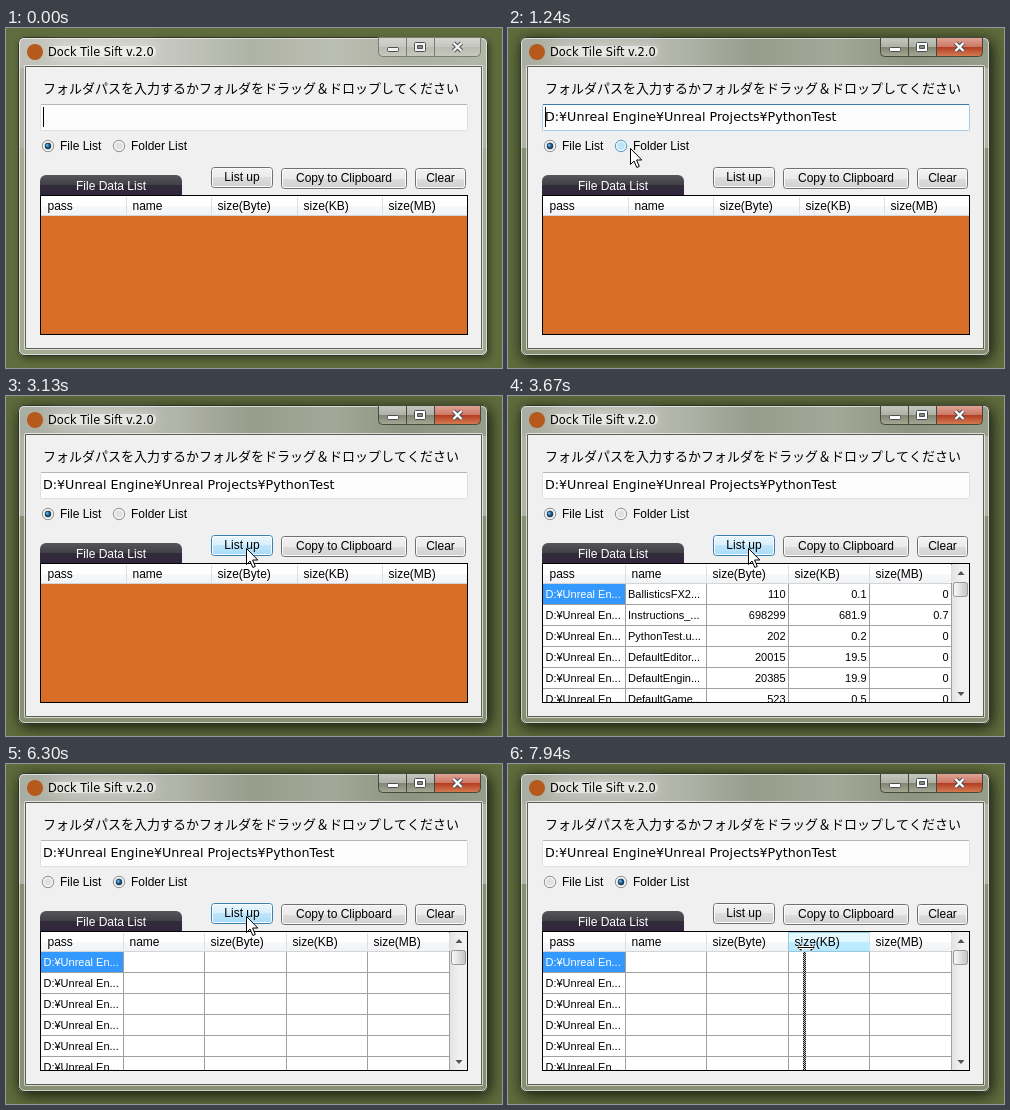
An HTML page with a canvas that plays this animation: 496 by 340 pixels, repeating every 8000 ms.

```html
<!DOCTYPE html>
<html lang="ja">
<head>
<meta charset="utf-8">
<style>
html, body { margin: 0; width: 100%; height: 100%; overflow: hidden; background: #5f6c3c; }
canvas { display: block; }
</style>
</head>
<body>
<canvas id="stage" width="496" height="340"></canvas>
<script>
const ctx = document.getElementById('stage').getContext('2d');
const LOOP = 8000;
const UI = '12px "Liberation Sans", sans-serif';
const CELL = '11px "Liberation Sans", sans-serif';
const WIDE = 'px "DejaVu Sans", sans-serif';

// Moments when the interface changes, in ms
const at = {
  activate: 70, drop: 780, caret: 1090, folderMode: 1600, fileMode: 2420,
  press: 3260, release: 3430, fileRows: 3670, folderModeAgain: 5360,
  pressAgain: 5970, releaseAgain: 6200, folderRows: 6290, resize: 7200, split: 7450
};

const spot = {
  enter: [290, 338], field: [195, 80], drop: [177, 85], fileRadio: [43, 109],
  folderRadio: [122, 120], listButton: [240, 152], splitter: [119, 183], splitEnd: [298, 183]
};

// Pointer moves: start, end, destination and downward sag in between
const moves = [
  [150, 540, spot.field, 0],
  [540, 850, spot.drop, 0],
  [850, 1240, spot.folderRadio, 20],
  [1640, 2100, spot.fileRadio, 0],
  [2420, 3130, spot.listButton, 20],
  [4280, 4660, spot.folderRadio, 0],
  [5360, 5820, spot.listButton, 0],
  [6600, 7300, spot.splitter, 0],
  [7500, 7940, spot.splitEnd, 0]
];

const files = [
  ['BallisticsFX2...', 110], ['Instructions_...', 698299], ['PythonTest.u...', 202],
  ['DefaultEditor...', 20015], ['DefaultEngin...', 20385], ['DefaultGame...', 523]
];
const headers = ['pass', 'name', 'size(Byte)', 'size(KB)', 'size(MB)'];
const columnEdges = width => Array.from({ length: 6 }, (_, i) => Math.round(35 + width * i));
const emptyEdges = columnEdges(85.2);
const filledEdges = columnEdges(81.6);

const between = (t, a, b) => t >= a && t < b;
const smooth = k => k * k * (3 - 2 * k);
const oneDecimal = n => String(+n.toFixed(1));

function pointerAt(t) {
  if (t < moves[0][0]) return null;
  let [x, y] = spot.enter;
  for (const [start, end, [toX, toY], sag] of moves) {
    if (t < start) break;
    const k = smooth(Math.min(1, (t - start) / (end - start)));
    x += (toX - x) * k;
    y += (toY - y) * k + sag * Math.sin(Math.PI * k);
  }
  return { x: Math.round(x), y: Math.round(y) };
}

function rect(x, y, w, h, fill) {
  ctx.fillStyle = fill;
  ctx.fillRect(x, y, w, h);
}

function box(x, y, w, h, r, fill, stroke) {
  const inset = stroke ? .5 : 0;
  ctx.beginPath();
  ctx.roundRect(x + inset, y + inset, w - 2 * inset, h - 2 * inset, r);
  paint(fill, stroke);
}

function disc(x, y, r, fill, stroke) {
  ctx.beginPath();
  ctx.arc(x, y, r, 0, 7);
  paint(fill, stroke);
}

function polygon(points, fill, stroke) {
  ctx.beginPath();
  points.forEach(([x, y]) => ctx.lineTo(x, y));
  ctx.closePath();
  paint(fill, stroke);
}

function paint(fill, stroke, width = 1) {
  if (fill) { ctx.fillStyle = fill; ctx.fill(); }
  if (stroke) { ctx.strokeStyle = stroke; ctx.lineWidth = width; ctx.stroke(); }
}

function text(s, x, y, font = UI, color = '#000', align = 'left') {
  ctx.font = font;
  ctx.fillStyle = color;
  ctx.textAlign = align;
  ctx.fillText(s, x, y);
}

function spread(gradient, colors) {
  colors.forEach((color, i) => gradient.addColorStop(i / (colors.length - 1), color));
  return gradient;
}
const across = (x, w, ...colors) => spread(ctx.createLinearGradient(x, 0, x + w, 0), colors);
const down = (y, h, ...colors) => spread(ctx.createLinearGradient(0, y, 0, y + h), colors);

// Two-tone glossy fill with a break in the middle
function gloss(y, h, [a, b, c, d]) {
  const g = ctx.createLinearGradient(0, y, 0, y + h);
  g.addColorStop(0, a);
  g.addColorStop(.5, b);
  g.addColorStop(.5, c);
  g.addColorStop(1, d);
  return g;
}

function drawFrame(active) {
  rect(0, 0, 496, 340, '#5f6c3c');
  ctx.save();
  ctx.shadowColor = active ? 'rgba(0,0,0,.8)' : 'rgba(0,0,0,.4)';
  ctx.shadowBlur = active ? 15 : 7;
  ctx.shadowOffsetX = 2;
  ctx.shadowOffsetY = 3;
  box(12, 9, 470, 319, 6, '#888f72');
  ctx.restore();

  box(12, 9, 470, 319, 6, active ? '#888f72' : '#a5aa93', '#2f332a');
  rect(13, 38, 468, 82, '#b0b3a6');
  box(13, 10, 468, 30, [5, 5, 0, 0], active
    ? across(13, 468, '#a9aca0', '#b8bab1', '#b2b5aa', '#979c8b', '#a3a898', '#8e947f', '#989d8a')
    : across(13, 468, '#bfc1b8', '#cccec6', '#c4c6be', '#afb3a5', '#bbbeb2', '#adb1a1', '#b3b7a8'));
  box(13, 10, 468, 317, 5, null, 'rgba(255,255,255,.6)');

  ctx.save();
  ctx.shadowColor = 'rgba(255,255,255,.8)';
  ctx.shadowBlur = 14;
  box(44, 18, 106, 11, 5, 'rgba(255,255,255,.55)');
  ctx.restore();
  text('Dock Tile Sift v.2.0', 42, 28, '11.4' + WIDE);
  disc(29, 24, 8, '#b5591d');

  box(18, 37, 459, 285, 1, null, 'rgba(255,255,255,.65)');
  box(19, 38, 457, 283, 0, '#f0f0f0', '#5b5f52');
  drawCaptionButtons(active);
}

function drawCaptionButtons(active) {
  const plain = gloss(10, 18, active ? ['#c6c8c0', '#adb0a5', '#80856f', '#a2a693']
                                     : ['#d2d3cd', '#c6c8c0', '#b9bbb2', '#c6c8be']);
  const close = active ? gloss(10, 18, ['#dfa395', '#cc7664', '#b43a22', '#d27a50']) : plain;
  const edge = active ? '#44483e' : '#7a7d72';
  const mark = active ? '#fff' : '#f2f2f2';
  const outline = '#4b4e55';
  box(372, 9, 29, 20, [0, 0, 0, 4], plain, edge);
  box(400, 9, 29, 20, 0, plain, edge);
  box(428, 9, 47, 20, [0, 0, 4, 0], close, edge);
  box(381, 19, 12, 5, 1, mark, outline);
  box(408, 14, 12, 10, 1, mark, outline);
  box(411, 17, 6, 4, 0, '#8b8e86', outline);
  ctx.beginPath();
  for (const slope of [-4, 4]) {
    ctx.moveTo(447.5, 19 - slope);
    ctx.lineTo(455.5, 19 + slope);
  }
  paint(null, outline, 4.4);
  paint(null, mark, 2.4);
}

function drawInput(t) {
  text('フォルダパスを入力するかフォルダをドラッグ＆ドロップしてください', 37, 65,
    '13px "Noto Sans CJK JP", "Noto Sans CJK", sans-serif');
  const focused = between(t, at.activate, at.folderMode);
  box(34, 76, 428, 27, 1, '#fdfdfd', focused ? '#a4cbe6' : '#dedfe3');
  rect(35, 76, 426, 1, focused ? '#3d7bad' : '#b4b6bd');
  if (t >= at.drop) text('D:¥Unreal Engine¥Unreal Projects¥PythonTest', 37, 93, '12.7' + WIDE);
  if (t < at.activate || between(t, at.caret, at.folderMode)) rect(37, 79, 1, 20, '#000');
}

function drawRadio(x, label, selected, hot) {
  disc(x, 118, 5.7, hot ? '#e9f6fd' : '#f6f6f6', hot ? '#5a9bc6' : '#8e8f8f');
  disc(x, 118, 3.8, hot ? '#bfe3f6' : '#dfe1e3');
  if (selected) {
    const bead = ctx.createRadialGradient(x - 1, 117, .3, x, 118, 3.4);
    disc(x, 118, 3.2, spread(bead, ['#7fc4e8', '#1b5a86', '#12324d']));
  }
  text(label, x + 12, 122);
}

const buttonStyles = {
  normal: ['#707070', '#fbfbfb', ['#f3f3f3', '#ebebeb', '#dddddd', '#cfcfcf']],
  focus: ['#3c7fb1', '#45cdf2', ['#f3f3f3', '#ebebeb', '#dddddd', '#cfcfcf']],
  hot: ['#3c7fb1', '#fbfbfb', ['#eaf6fd', '#d9f0fc', '#bee6fd', '#a7d9f5']],
  pressed: ['#2c628b', '#9cc6dd', ['#d8edf8', '#c4e5f6', '#98d1ef', '#68b3db']]
};

function drawButton(x, y, w, label, state = 'normal') {
  const [edge, rim, colors] = buttonStyles[state];
  box(x, y, w, 21, 3, gloss(y, 21, colors), edge);
  box(x + 1, y + 1, w - 2, 19, 2, null, rim);
  text(label, x + w / 2, y + 14, UI, '#000', 'center');
}

function listButtonState(t, p) {
  if (between(t, at.press, at.release) || between(t, at.pressAgain, at.releaseAgain)) return 'pressed';
  if (p && between(p.x, 205, 267) && between(p.y, 139, 160)) return 'hot';
  return between(t, at.release, 5190) || between(t, at.releaseAgain, at.split) ? 'focus' : 'normal';
}

function drawHeader(edges, hotColumn) {
  rect(35, 168, edges[5] - 35, 20, gloss(168, 20, ['#fff', '#fff', '#f7f8fa', '#f1f2f4']));
  rect(35, 187, edges[5] - 35, 1, '#d5d5d5');
  headers.forEach((label, i) => {
    const x = edges[i], w = edges[i + 1] - x;
    if (i === hotColumn) {
      box(x, 168, w + 1, 20, 0, gloss(168, 20, ['#e3f7ff', '#e3f7ff', '#bdedff', '#b7e7fb']), '#93c9e3');
    }
    rect(x + w, 169, 1, 18, '#dcdee2');
    text(label, x + 6.5, 182);
  });
}

function drawScrollbar() {
  rect(444, 168, 17, 138, across(444, 17, '#e3e3e3', '#f0f0f0', '#f0f0f0'));
  for (const [base, tip] of [[179, 175], [296, 300]]) {
    polygon([[449.5, base], [456.5, base], [453, tip]], '#505357');
  }
  box(445, 186, 15, 15, 2, across(446, 14, '#f6f6f6', '#e9e9eb', '#d2d3d5', '#c2c3c6'), '#979797');
}

function drawRows(folders) {
  rect(35, 188, 409, 118, '#fff');
  rect(35, 188, 82, 20, '#3399ff');
  files.forEach(([name, bytes], row) => {
    const base = 202 + 21 * row;
    text('D:¥Unreal En...', 37.5, base, CELL, row ? '#000' : '#fff');
    if (!folders) {
      text(name, 120, base, CELL);
      [bytes, bytes / 1024, bytes / 1024 ** 2].forEach((size, i) =>
        text(oneDecimal(size), filledEdges[i + 3] - 2.5, base, CELL, '#000', 'right'));
    }
    rect(35, base + 6, 409, 1, '#a0a0a0');
  });
  filledEdges.slice(1).forEach(x => rect(x, 188, 1, 118, '#a0a0a0'));
}

function drawGrid(t, p) {
  box(34, 147, 142, 20, [6, 6, 0, 0], gloss(147, 20, ['#55555a', '#414046', '#302b38', '#33263f']));
  text('File Data List', 105, 162, UI, '#fff', 'center');
  rect(34, 167, 428, 140, '#000');
  rect(35, 168, 426, 138, '#d96e28');
  ctx.save();
  ctx.beginPath();
  ctx.rect(35, 168, 426, 138);
  ctx.clip();
  if (t < at.fileRows) {
    drawHeader(emptyEdges, -1);
  } else {
    const hot = t >= at.resize ? filledEdges.findIndex(x => x > p.x) - 1 : -1;
    drawRows(t >= at.folderRows);
    drawHeader(filledEdges, hot);
    drawScrollbar();
    if (t >= at.split) drawSplitLine(p.x - 3);
  }
  ctx.restore();
}

function drawSplitLine(x) {
  for (let y = 188; y < 306; y++) {
    for (let i = 0; i < 3; i++) rect(x + i, y, 1, 1, (i + y) % 2 ? '#111' : '#c8c8c8');
  }
}

function drawPointer(t, { x, y }) {
  ctx.save();
  ctx.translate(x, y);
  if (t >= at.resize) {
    for (const side of [-1, 1]) polygon([[9 * side, .5], [4 * side, -4.5], [4 * side, 5.5]], '#000', '#fff');
    rect(-7, -1, 14, 3, '#fff');
    rect(-8, 0, 16, 1, '#000');
  } else {
    polygon([[.5, .5], [.5, 16.5], [4, 13], [6.8, 19.5], [9.3, 18.4], [6.6, 12], [11.8, 12]], '#fff', '#000');
    if (t < at.drop) drawCopyBadge();
  }
  ctx.restore();
}

function drawCopyBadge() {
  ctx.setLineDash([2, 1]);
  box(3, 17, 12, 8, 0, null, '#000');
  ctx.setLineDash([]);
  box(10, 20, 11, 11, 0, '#fff', '#000');
  rect(13, 25, 5, 1, '#000');
  rect(15, 23, 1, 5, '#000');
}

function draw(t) {
  const p = pointerAt(t);
  const over = x => !!p && t >= at.drop && Math.hypot(p.x - x, p.y - 118) < 10;
  const folderMode = between(t, at.folderMode, at.fileMode) || t >= at.folderModeAgain;
  drawFrame(t >= at.activate);
  drawInput(t);
  drawRadio(42, 'File List', !folderMode, over(42));
  drawRadio(113, 'Folder List', folderMode, over(113));
  drawGrid(t, p);
  drawButton(205, 139, 62, 'List up', listButtonState(t, p));
  drawButton(275, 140, 126, 'Copy to Clipboard');
  drawButton(409, 140, 51, 'Clear');
  if (p) drawPointer(t, p);
}

function tick() {
  draw(performance.now() % LOOP);
  requestAnimationFrame(tick);
}
tick();
</script>
</body>
</html>
```
